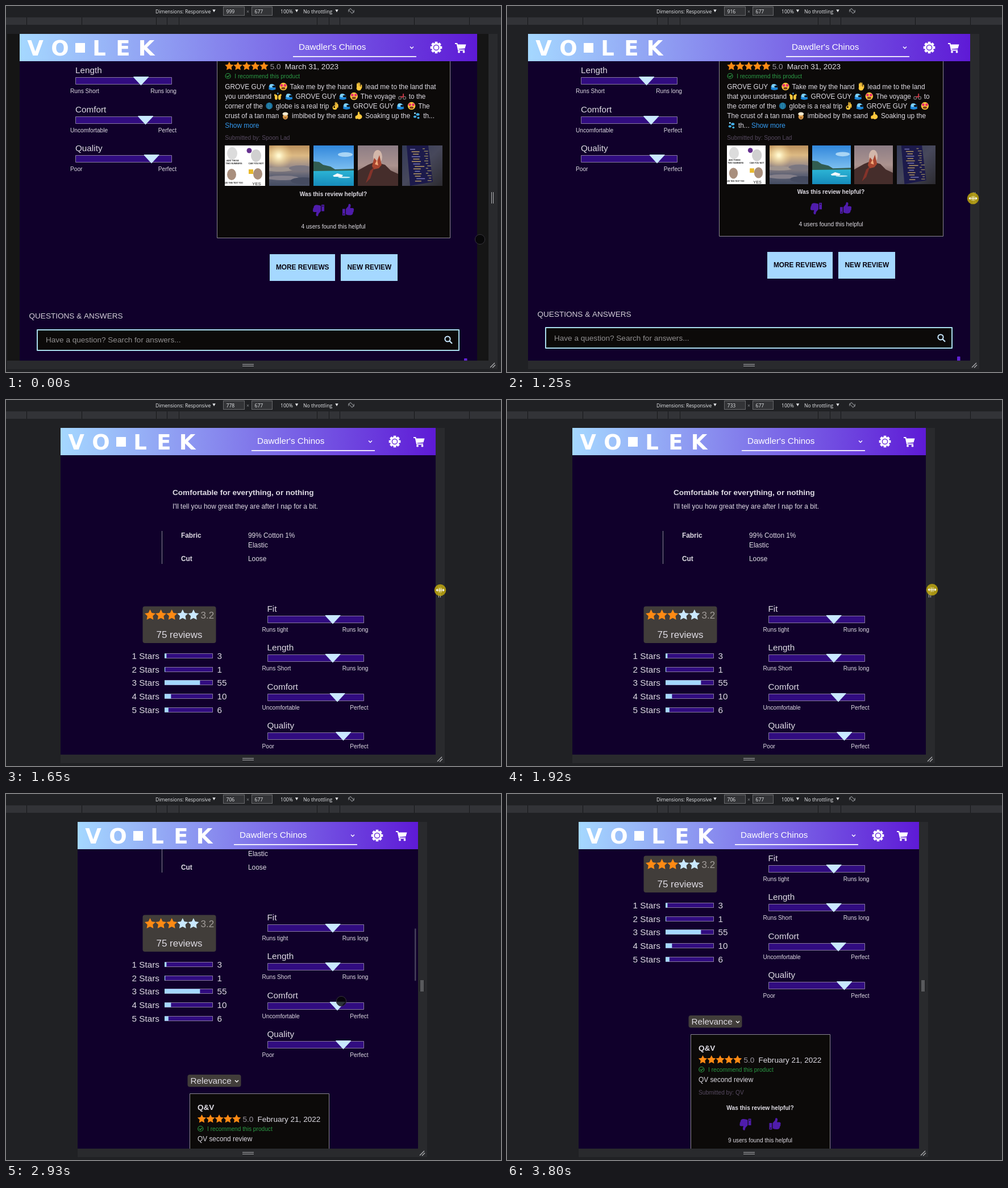
Animation of 871x643 px, one loop 4200 ms. Source, as an HTML page with a canvas:

```html
<!DOCTYPE html>
<html lang="en">
<head>
<meta charset="utf-8">
<title>Responsive shop page</title>
<style>
html, body { margin: 0; width: 100%; height: 100%; overflow: hidden; background: #202124; }
canvas { display: block; }
</style>
</head>
<body>
<canvas id="stage" width="871" height="643"></canvas>
<script>
const c = document.getElementById('stage').getContext('2d');
const LOOP = 4200, ZOOM = 0.8484, HEAD = 49, TOP = 97, BOTTOM = 623;
const SKY = '#a5d8ff', PALE = '#c9e8ff', ORANGE = '#ff8a14', LIGHT = '#dedbe3', PURPLE = '#4f1cab', INK = '#0c0a09';

const TICKS = [0, 60, 120, 190, 260, 320, 390, 460, 520, 650, 850,
  990, 1050, 1120, 1190, 1250, 1320, 1390, 1450, 1520, 1590, 1650, 1720, 1790, 1920,
  2260, 2330, 2390, 2590, 2660, 2720, 2790, 2860, 2930, 3060, 3130,
  3530, 3600, 3660, 3730, 3800];
const WIDTH = [[850, 999], [990, 991], [1250, 916], [1450, 868], [1650, 778], [1920, 733], [2260, 724], [2390, 706]];
const SCROLL = [[2720, 0], [2790, 30], [2930, 150], [3060, 236], [3130, 254]];
const MOUSE_X = [[0, 834], [520, 862], [850, 860], [990, 851], [1250, 820], [1450, 803], [1650, 764],
  [1920, 748], [2390, 736], [2530, 736], [2790, 590], [3500, 590], [3800, 800]];
const MOUSE_Y = [[0, 410], [520, 350], [850, 338], [1250, 338], [1650, 334], [2390, 332], [2530, 332],
  [2790, 364], [3500, 364], [3800, 662]];

function track(t, keys) {
  const i = keys.findIndex(k => k[0] > t);
  if (i === 0) return keys[0][1];
  if (i < 0) return keys[keys.length - 1][1];
  const [t0, a] = keys[i - 1], [t1, b] = keys[i];
  return a + (b - a) * (t - t0) / (t1 - t0);
}

function rect(x, y, w, h, color) { c.fillStyle = color; c.fillRect(x, y, w, h); }
function box(x, y, w, h, fill, line, lw = 1) {
  [x, y, w, h] = [x, y, w, h].map(Math.round);
  rect(x, y, w, h, fill);
  c.strokeStyle = line; c.lineWidth = lw;
  c.strokeRect(x + lw / 2, y + lw / 2, w - lw, h - lw);
}
function round(x, y, w, h, r, color) {
  c.fillStyle = color; c.beginPath(); c.roundRect(x, y, w, h, r); c.fill();
}
function oval(x, y, rx, ry, color) {
  c.fillStyle = color; c.beginPath(); c.ellipse(x, y, rx, ry, 0, 0, 7); c.fill();
}
function ring(x, y, r, color, lw) {
  c.strokeStyle = color; c.lineWidth = lw;
  c.beginPath(); c.arc(x, y, r, 0, 7); c.stroke();
}
function poly(points, color) {
  c.fillStyle = color; c.beginPath();
  for (let i = 0; i < points.length; i += 2) c.lineTo(points[i], points[i + 1]);
  c.fill();
}
function stroke(points, color, lw) {
  c.strokeStyle = color; c.lineWidth = lw; c.beginPath();
  for (let i = 0; i < points.length; i += 2) c.lineTo(points[i], points[i + 1]);
  c.stroke();
}
function setFont(size, bold) {
  c.font = `${bold ? 'bold ' : ''}${size * ZOOM}px "Liberation Sans", Arial, sans-serif`;
}
function text(s, x, y, size, color = LIGHT, bold = false, align = 'left') {
  setFont(size, bold);
  c.fillStyle = color; c.textAlign = align; c.fillText(s, x, Math.round(y));
}
function chevron(x, y) { stroke([x - 3, y - 1.5, x, y + 1.5, x + 3, y - 1.5], '#fff', 1.4); }

function star(x, y, r, color) {
  const p = [];
  for (let i = 0; i < 10; i++) {
    const a = Math.PI * (i / 5 - 0.5), d = i % 2 ? r * 0.5 : r;
    p.push(x + d * Math.cos(a), y + d * Math.sin(a));
  }
  poly(p, color);
}

const HAND = new Path2D('M6 9L10 4.5L11 .5Q15-.5 14.5 4L13.5 7.5H18Q21 8 19.8 11.5Q20.3 14 18.7 15Q18.5 19.5 14.5 20Q10 20.5 6 18.5ZM0 9H4.8V20.5H0Z');
function thumb(x, y, down) {
  c.save();
  c.translate(x, y);
  if (down) c.rotate(Math.PI);
  c.translate(-10, -10);
  c.fillStyle = PURPLE; c.fill(HAND);
  oval(2.4, 18, 0.9, 0.9, INK);
  c.restore();
}

// Emoji as small ovals: colour, x, y, rx, ry.
const GOLD = '#ffc83d';
const EMOJI = {
  wave: [['#1b86d8', 7, 1, 6, 5], ['#7fd0f7', 6, -1, 4, 3.4], [INK, 10, 0, 3, 1.7], ['#1b86d8', 7, 4, 6.5, 2.2]],
  wow: [[GOLD, 7, 0, 6.7, 6.7], ['#e8306a', 4, -2, 2.4, 2.4], ['#e8306a', 10, -2, 2.4, 2.4], ['#7a3b1c', 7, 3, 3.6, 2]],
  palm: [[GOLD, 7, 3, 4.3, 4], [GOLD, 4, -2, 1, 4], [GOLD, 6, -3, 1, 4.4], [GOLD, 8.3, -3, 1, 4.2], [GOLD, 11.3, 0, 1.1, 3.4]],
  cheer: [[GOLD, 4, 2, 2.4, 4.4], [GOLD, 10, 2, 2.4, 4.4], [GOLD, 2, -2, 1.3, 2], [GOLD, 12, -2, 1.3, 2], ['#4aa8e8', 7, -5, 1, 1.5]],
  bike: [['#777', 3, 3, 3, 3], [INK, 3, 3, 1.8, 1.8], ['#777', 11, 3, 3, 3], [INK, 11, 3, 1.8, 1.8], ['#d43a4a', 7, 1, 3.5, 1], ['#d43a4a', 9, -2, 1, 3]],
  globe: [['#1c6f9c', 7, 0, 6, 6], ['#35a0b8', 7, 0, 2.4, 5.5], ['#1c6f9c', 7, 0, 1.4, 5]],
  ok: [[GOLD, 6, 3, 4, 3.7], [INK, 5, 2, 1.5, 1.5], [GOLD, 7, -3, 1, 4], [GOLD, 9.3, -2, 1, 4.4], [GOLD, 11, 0, 1, 3.4]],
  mug: [['#d99a4a', 7, 2, 4.5, 5], ['#f4ead0', 7, -3, 5, 3], ['#8a552b', 7, 4, 2, 1]],
  thumb: [[GOLD, 8, 2, 5, 4.4], [GOLD, 7, -3, 1.6, 3.8], [GOLD, 3, 3, 2, 3]],
  drops: [['#43b0ee', 4, 2, 2.6, 2], ['#43b0ee', 9, -2, 3, 2.2], ['#43b0ee', 10, 4, 2, 1.7], ['#9bdcfb', 4, -4, 1.5, 1.4]]
};
const BODY = ('GROVE GUY :wave :wow Take me by the hand :palm lead me to the land that you understand :cheer ' +
  ':wave GROVE GUY :wave :wow The voyage :bike to the corner of the :globe globe is a real trip :ok ' +
  ':wave GROVE GUY :wave :wow The crust of a tan man :mug imbibed by the sand :thumb ' +
  'Soaking up the :drops th...').split(' ').concat('Show more');

function bodyText(x0, y, width) {
  let x = x0;
  setFont(14);
  const space = c.measureText(' ').width;
  for (const word of BODY) {
    const art = EMOJI[word.slice(1)];
    const w = art ? 16.3 : c.measureText(word).width;
    if (x + w > x0 + width) { x = x0; y += 17; }
    if (art) for (const [color, dx, dy, rx, ry] of art) oval(x + 1 + dx, y - 4.5 + dy, rx, ry, color);
    else text(word, x, y, 14, word === 'Show more' ? '#339af0' : LIGHT);
    x += w + space;
  }
}

function gradient(x0, y0, x1, y1, ...colors) {
  const g = c.createLinearGradient(x0, y0, x1, y1);
  colors.forEach((k, i) => g.addColorStop(i / (colors.length - 1), k));
  return g;
}

// Pictures are drawn on a 71-unit square.
const PHOTOS = [
  () => {
    rect(0, 0, 71, 71, '#fff');
    oval(13, 14, 9, 11, '#dcdcdc'); oval(55, 18, 9, 11, '#d0d0d0');
    oval(12, 51, 8, 10, '#a98f7d'); oval(58, 50, 8, 10, '#a98f7d');
    oval(43, 9, 4.5, 4.5, '#65308f');
    rect(42, 42, 8, 8, '#e8b92c');
    text('ADD THESE', 14, 28, 4.5, '#222', true, 'center');
    text('TWO NUMBERS', 16, 33, 4.5, '#222', true, 'center');
    text('CAN YOU NOT', 55, 33, 4.5, '#222', true, 'center');
    text('ADD THIS TEXT TOO', 15, 67, 4, '#222', true, 'center');
    text('YES', 56, 70, 9, '#222', false, 'center');
  },
  () => {
    rect(0, 0, 71, 71, gradient(0, 0, 0, 71, '#b98f5c', '#dcb983', '#a08f88', '#5f6274', '#444c62'));
    const sun = c.createRadialGradient(17, 18, 2, 17, 18, 24);
    sun.addColorStop(0, '#fff8cf'); sun.addColorStop(1, '#f6cf8500');
    rect(0, 0, 71, 50, sun);
    oval(18, 42, 24, 4, '#a0958f'); oval(55, 40, 20, 5, '#7a7680');
    oval(24, 57, 28, 4, '#85808a'); oval(60, 62, 22, 6, '#454b60');
  },
  () => {
    rect(0, 0, 71, 71, gradient(0, 0, 0, 44, '#3187dc', '#7fc1f1'));
    oval(56, 16, 13, 4, '#a9d5f5');
    rect(0, 43, 71, 28, gradient(0, 43, 0, 71, '#2db6d6', '#168bbb'));
    poly([0, 28, 10, 29, 17, 34, 30, 37, 38, 42, 71, 41, 71, 44, 0, 45], '#315c50');
    poly([34, 53, 42, 49, 52, 52, 50, 55, 36, 55], '#f3f8fb');
    oval(54, 56, 11, 1.3, '#c6ebf4');
  },
  () => {
    rect(0, 0, 71, 71, gradient(0, 0, 0, 71, '#8d7d85', '#ab938f', '#5e4643'));
    poly([0, 71, 0, 44, 18, 34, 30, 29, 48, 34, 58, 44, 71, 50, 71, 71], '#452d2b');
    oval(35, 20, 8, 12, '#d3b7aa');
    poly([25, 36, 29, 22, 34, 28, 38, 17, 42, 34, 37, 40, 28, 42], '#a8452f');
    poly([22, 44, 29, 38, 22, 58, 14, 66], '#84332a');
    poly([30, 33, 34, 25, 36, 35], '#f2a878');
  },
  () => {
    rect(0, 0, 71, 71, gradient(0, 0, 71, 71, '#333a58', '#47485b', '#2c2b30'));
    poly([8, 0, 46, 0, 54, 64, 14, 71], '#1c1a4b');
    for (let i = 0; i < 14; i++) {
      const x = 14 + i * 0.6 + i * 7 % 5, y = 6 + i * 4.3;
      rect(x, y, 9 + i * 5 % 9, 1.5, i % 3 ? '#b79a62' : '#7878b8');
      rect(x + 22, y - 1, 4 + i * 3 % 6, 1.5, '#8e815f');
    }
  }
];

function slider(x, y, name, low, high, mark) {
  text(name, x, y - 7, 18);
  box(x, y, 170, 13, '#310c80', '#87779f');
  const m = x + mark, top = Math.round(y) - 0.3;
  c.lineJoin = 'round';
  poly([m - 13, top, m + 13, top, m, top + 14], PALE);
  stroke([m - 13, top, m + 13, top, m, top + 14, m - 13, top], PALE, 1.2);
  text(low, x - 9, y + 28, 12);
  text(high, x + 178, y + 28, 12, LIGHT, false, 'right');
}
function sliders(x, y) {
  slider(x, y, 'Fit', 'Runs tight', 'Runs long', 115.5);
  slider(x, y + 68.6, 'Length', 'Runs Short', 'Runs long', 115.5);
  slider(x, y + 137.2, 'Comfort', 'Uncomfortable', 'Perfect', 123.5);
  slider(x, y + 205.8, 'Quality', 'Poor', 'Perfect', 134);
}

function reviewHead(x, y, date) {
  for (let i = 0; i < 5; i++) star(x + 7.5 + i * 15.3, y, 8, ORANGE);
  text('5.0', x + 79.5, y + 5, 16, '#9b96a0');
  text(date, x + 105.5, y + 5, 16);
  ring(x + 5.3, y + 17, 4.5, '#2b9a45', 1.2);
  stroke([x + 3, y + 17, x + 5, y + 19, x + 8, y + 15.3], '#2b9a45', 1.2);
  text('I recommend this product', x + 17, y + 21, 12, '#2b9a45');
}
function reviewFoot(x, y, count) {
  text('Was this review helpful?', x, y, 12, LIGHT, true, 'center');
  thumb(x - 26, y + 26, true);
  thumb(x + 26, y + 24);
  text(count + ' users found this helpful', x, y + 57, 12, LIGHT, false, 'center');
}

function widePage(left, right) {
  const extra = right - left - 778;
  sliders(Math.round(left + 93 + extra * 0.19), 56.4);

  const x = Math.round(left + 336.4 + extra * 0.39), w = right - 47 - x, mid = x + Math.floor(w / 2);
  const tx = x + 14.3, inner = w - 28.7, size = (inner - 27.2) / 5, end = 245.5 + size;
  box(x, 40, w, end + 51.5, INK, '#8b8791');
  reviewHead(tx, 106, 'March 31, 2023');
  bodyText(tx, 146, inner);
  text('Submitted by: Spoon Lad', tx, 235, 12, '#574a61');
  PHOTOS.forEach((paint, i) => {
    c.save();
    c.translate(Math.round(tx + i * (size + 6.8)), 245);
    c.scale(Math.round(size) / 71, Math.round(size) / 71);
    c.beginPath(); c.rect(0, 0, 71, 71); c.clip();
    paint();
    c.restore();
  });
  reviewFoot(mid, end + 17, 4);

  const by = Math.round(end + 119);
  rect(mid - 112, by, 115, 47, SKY);
  rect(mid + 13, by, 100, 47, SKY);
  text('MORE REVIEWS', mid - 54.3, by + 27, 14, '#08040f', true, 'center');
  text('NEW REVIEW', mid + 63.3, by + 27, 14, '#08040f', true, 'center');

  text('QUESTIONS & ANSWERS', left + 16.5, end + 232.5, 16, '#d3cfd8');
  box(left + 30, end + 251, right - left - 61, 38, INK, '#a9dcec', 2);
  text('Have a question? Search for answers...', left + 46, end + 274.5, 16, '#918f90');
  ring(right - 52, end + 268.5, 4.6, PALE, 2);
  stroke([right - 48.5, end + 272, right - 44, end + 276.5], PALE, 2.2);
  round(right - 23, end + 302.5, 5.5, 20, 1, '#6023d2');
}

function narrowPage() {
  text('Comfortable for everything, or nothing', 293, 167, 16, LIGHT, true);
  text("I'll tell you how great they are after I nap for a bit.", 293, 191, 14);
  rect(274, 230, 1, 58, '#858a90');
  text('Fabric', 308, 242, 14, LIGHT, true);
  text('99% Cotton 1%', 426, 242, 14);
  text('Elastic', 426, 259, 14);
  text('Cut', 308, 283, 14, LIGHT, true);
  text('Loose', 426, 283, 14);

  round(240.5, 362.5, 129, 64.5, 4, '#413d3a');
  for (let i = 0; i < 5; i++) star(253.5 + i * 19.1, 378, 10, i < 3 ? ORANGE : PALE);
  text('3.2', 342.5, 383.5, 20, '#a39e9b');
  text('75 reviews', 305, 417.5, 20, LIGHT, false, 'center');
  [3, 1, 55, 10, 6].forEach((n, i) => {
    const y = Math.round(445 + i * 23.7);
    text(i + 1 + ' Stars', 221.5, y + 10, 18);
    box(279, y, 85, 9, '#310c80', '#87779f');
    rect(279, y + 0.5, 85 * n / 75, 8, SKY);
    text(n, 371.5, y + 10, 18);
  });
  sliders(459.5, 378.6);

  round(319.5, 643, 94, 21.5, 4, '#413d3a');
  text('Relevance', 324.5, 658.5, 18);
  chevron(406, 654.5);
  box(323, 676, 246, 230, INK, '#8b8791');
  text('Q&V', 337, 705, 16, LIGHT, true);
  reviewHead(337, 721, 'February 21, 2022');
  text('QV second review', 337, 760, 14);
  text('Submitted by: QV', 337, 782, 12, '#574a61');
  reviewFoot(445.5, 809, 9);
}

function header(left, right) {
  rect(left, HEAD, right - left, TOP - HEAD, gradient(left, 0, right, 0, SKY, '#5e1ad6'));
  c.font = 'bold 37px "DejaVu Sans", sans-serif';
  c.fillStyle = '#fff'; c.textAlign = 'center';
  [['V', 27.5], ['O', 71], ['L', 140], ['E', 182], ['K', 223]].forEach(([s, x]) => c.fillText(s, left + x, 87));
  rect(left + 98, 65, 17, 17, '#fff');

  text("Dawdler's Chinos", right - 314, 77, 18, '#fff');
  rect(right - 324, 88, 217, 1.7, '#fff');
  chevron(right - 115, 73);

  const gx = right - 72, gy = 73;
  for (let i = 0; i < 8; i++) {
    const a = i * Math.PI / 4;
    stroke([gx, gy, gx + 10.3 * Math.cos(a), gy + 10.3 * Math.sin(a)], '#fff', 4.6);
  }
  oval(gx, gy, 8.2, 8.2, '#fff');
  ring(gx, gy, 4.6, '#6a33da', 1.5);

  const x = right - 39, y = 65;
  stroke([x, y + 1, x + 3.5, y + 1, x + 6, y + 12.5, x + 17, y + 12.5], '#fff', 1.8);
  poly([x + 4, y + 2.5, x + 19.5, y + 2.5, x + 17.5, y + 9.5, x + 5.5, y + 10.5], '#fff');
  oval(x + 7, y + 15.7, 1.9, 1.9, '#fff');
  oval(x + 15.5, y + 15.7, 1.9, 1.9, '#fff');
}

function toolbar(width) {
  rect(0, 20, 871, 13, '#323337');
  for (const x of [36, 133, 264, 283, 304, 547, 568, 587, 718, 815]) rect(x, 20, 1, 13, '#17181a');
  box(382, 1, 38, 16, '#333437', '#68696c');
  box(432, 1, 37, 16, '#333437', '#68696c');
  c.font = '8.6px "Open Sans", sans-serif';
  c.textAlign = 'left';
  c.fillStyle = '#e8eaed';
  const label = [['Dimensions: Responsive', 263], [Math.round(width), 387.5], ['677', 437.5], ['100%', 483], ['No throttling', 523]];
  for (const [s, x] of label) c.fillText(s, x, 13);
  c.fillStyle = '#8a8d91';
  c.fillText('×', 423, 13);
  for (const x of [366, 511.5, 582]) poly([x - 2.7, 6.3, x + 2.7, 6.3, x, 11], '#e8eaed');
  c.save();
  c.translate(607.5, 8.7);
  c.rotate(-Math.PI / 4);
  c.strokeStyle = '#8a8d91'; c.lineWidth = 1;
  c.strokeRect(-2, -4, 4, 8);
  for (const a of [0.4, 3.5]) { c.beginPath(); c.arc(0, 0, 5, a, a + 1.1); c.stroke(); }
  c.restore();
}

function handles(edge, start) {
  rect(edge, HEAD, 16, 638 - HEAD, '#292a2d');
  rect(start, BOTTOM, edge - start, 15, '#292a2d');
  rect(edge + 5, 327, 1, 20, '#b0b1b4');
  rect(edge + 8, 327, 1, 20, '#b0b1b4');
  rect(416, 629, 20, 1, '#b0b1b4');
  rect(416, 632, 20, 1, '#b0b1b4');
  stroke([edge + 3, 635, edge + 11, 627], '#b0b1b4', 1.2);
  stroke([edge + 7, 635.5, edge + 12, 630.5], '#b0b1b4', 1.2);
}

function pointer(t) {
  const x = track(t, MOUSE_X), y = track(t, MOUSE_Y);
  const held = t >= 850 && t < 2590;
  if (held) oval(x, y, 10.3, 10.3, 'rgba(192,168,14,.84)');
  else {
    oval(x, y, 8.8, 8.8, 'rgba(5,5,6,.8)');
    ring(x, y, 8.6, '#36343b', 1);
  }
  if (held || t >= 520 && t < 850) {
    stroke([x - 6, y, x + 6, y], '#fff', 1);
    rect(x - 2, y - 4, 1, 8, '#fff');
    rect(x + 1, y - 4, 1, 8, '#fff');
    poly([x - 7.5, y, x - 4.5, y - 3, x - 4.5, y + 3], '#fff');
    poly([x + 7.5, y, x + 4.5, y - 3, x + 4.5, y + 3], '#fff');
  }
}

function draw(now) {
  const time = now % LOOP, t = TICKS.filter(k => k <= time).pop();
  const width = track(t, WIDTH), w = Math.min(width, 948) * ZOOM;
  const left = Math.round(425.95 - w / 2), right = left + Math.ceil(w - 0.1);
  const capped = width > 948, half = width * ZOOM / 2;
  const start = capped ? Math.round(425.5 - half) : left;
  const edge = capped ? Math.round(425.5 + half) : right;

  rect(0, 0, 871, 643, '#202124');
  toolbar(width);
  rect(start, HEAD, edge - start, BOTTOM - HEAD, '#151515');
  handles(edge, start);
  rect(left, HEAD, right - left, BOTTOM - HEAD, '#10002b');

  c.save();
  c.beginPath(); c.rect(left, TOP, right - left, BOTTOM - TOP); c.clip();
  if (width > 850) widePage(left, right);
  else {
    const scroll = track(t, SCROLL);
    c.save();
    c.translate(0, -Math.round(scroll));
    narrowPage();
    c.restore();
    if (scroll > 0) {
      c.globalAlpha = track(t, [[3500, 1], [3700, 0]]);
      round(right - 6, 212 + scroll * 0.161, 2.5, 92, 1, '#46405a');
      c.globalAlpha = 1;
    }
  }
  c.restore();
  header(left, right);
  pointer(t);
}

const began = performance.now();
function tick() {
  draw(performance.now() - began);
  requestAnimationFrame(tick);
}
tick();
</script>
</body>
</html>
```
